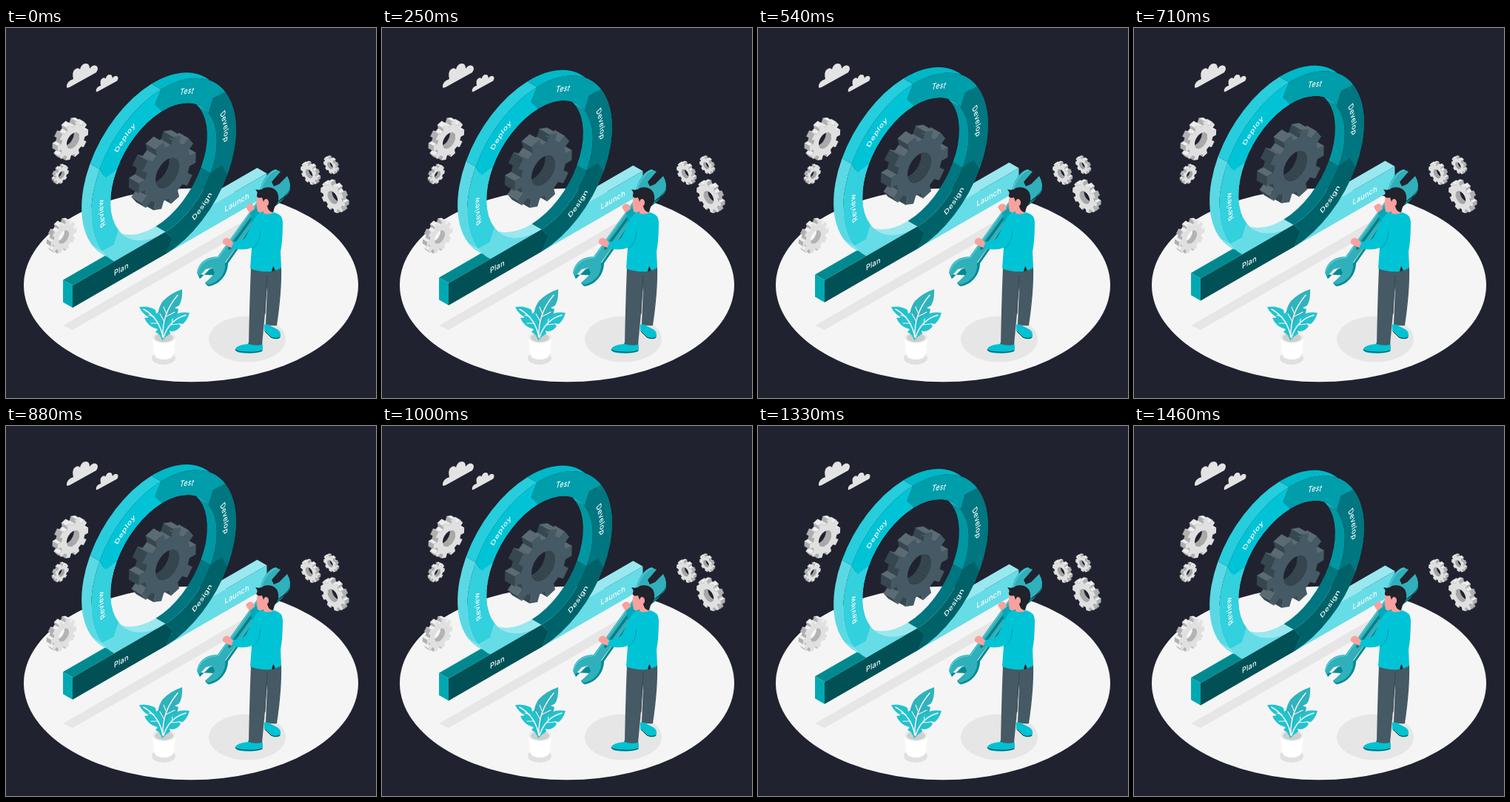
An HTML page that plays this animation: 500 by 500 pixels, repeating every 1.5 s.

```html
<!DOCTYPE html>
<html lang="en">
<head>
<meta charset="utf-8">
<title>Development cycle</title>
<style>
html, body { margin: 0; height: 100%; overflow: hidden; background: #20222f; }
svg { display: block; width: 100vw; height: 100vh; }
text { font: 500 10.5px Inter, sans-serif; letter-spacing: .25px; fill: #fff; text-anchor: middle; }
</style>
</head>
<body>
<svg id="stage" viewBox="0 0 500 500"></svg>
<script>
const OUTER = 113, MID = 98, INNER = 83, DEPTH = 15, PERIOD = 1500, LIFT = 10;

const polar = (r, deg) => {
  const a = deg * Math.PI / 180;
  return [r * Math.sin(a), -r * Math.cos(a)];
};
const at = (r, deg, shift = 0) => polar(r, deg).map(c => (c + shift).toFixed(2)).join(' ');
const arcTo = (r, deg, sweep, shift) => `A${r} ${r} 0 0 ${sweep} ${at(r, deg, shift)}`;
const shape = (fill, d, extra = '') => `<path fill="${fill}" d="${d}" ${extra}/>`;
const line = (color, width, d) =>
  `<path fill="none" stroke="${color}" stroke-width="${width}" stroke-linecap="round" d="${d}"/>`;
const ellipse = (fill, x, y, rx, ry) =>
  `<ellipse fill="${fill}" cx="${x}" cy="${y}" rx="${rx}" ry="${ry}"/>`;

// Isometric wall planes: side -1 rises to the right, side 1 falls to the right.
const plane = (x, y, side, content) =>
  `<g transform="matrix(.866 ${side * .5} 0 1 ${x} ${y})">${content}</g>`;

function gear(x, y, radius, teeth, side, [face, top, wall]) {
  const rim = [], hole = [], depth = radius * .34, dx = side * depth;
  for (let i = 0; i < teeth; i++) {
    for (const [f, r] of [[-.31, .79], [-.23, 1], [.23, 1], [.31, .79]])
      rim.push(polar(r * radius, (i + f) * 360 / teeth + 20));
  }
  for (let a = 360; a > 0; a -= 12) hole.push(polar(radius * .41, a));
  const walls = (points, lit) => points.map((p, i) => {
    const q = points[(i + 1) % points.length];
    const nx = q[1] - p[1], ny = p[0] - q[0];
    if (nx * dx - ny * depth <= 0) return '';
    const fill = -ny > Math.abs(nx) * 1.2 ? lit : wall;
    return shape(fill, `M${p}L${q}l${dx} ${-depth}L${p[0] + dx} ${p[1] - depth}Z`,
      `stroke="${fill}" stroke-width=".3"`);
  }).join('');
  const outline = `M${rim.join('L')}ZM${hole.join('L')}Z`;
  return plane(x, y, side, walls(hole, wall) + walls(rim, top) + shape(face, outline, 'fill-rule="evenodd"'));
}

// start angle, face, outer wall, inner wall
const segments = [
  [178, '#66dce6', '#80e3eb', '#99e8ef'],
  [238, '#33d0de', '#5ad9e4', '#80e3eb'],
  [298, '#00c4d6', '#26cddc', '#33d0de'],
  [-2, '#009dab', '#00b8c8', '#1ab4c0'],
  [58, '#007680', '#00919c', '#0097a2'],
  [118, '#006269', '#007680', '#007680']
];

function ring() {
  const wall = (r, a, fill) => shape(fill,
    `M${at(r, a)}${arcTo(r, a + 60, 1)}L${at(r, a + 60, -DEPTH)}${arcTo(r, a, 0, -DEPTH)}Z`);
  const face = (a, fill) => shape(fill,
    `M${at(OUTER, a)}${arcTo(OUTER, a + 60, 1)}L${at(MID, a + 54)}L${at(INNER, a + 60)}` +
    `${arcTo(INNER, a, 0)}L${at(MID, a - 6)}Z`);
  return segments.map(([a, , outer, inner]) => wall(INNER, a, inner) + wall(OUTER, a, outer)).join('') +
    segments.map(([a, fill]) => face(a, fill)).join('');
}

function ringLabel(word, angle, reverse) {
  const r = MID + (reverse ? 3.8 : -3.8), from = reverse ? 40 : -40;
  return `<path id="${word}" fill="none" d="M${at(r, angle + from)}${arcTo(r, angle - from, reverse ? 0 : 1)}"/>
    <text><textPath href="#${word}" startOffset="50%">${word}</textPath></text>`;
}

const barLabel = (word, u) => `<text x="${u}" y="102.5">${word}</text>`;

const pale = ['#e0e0e0', '#ededed', '#b0b0b0'];
const steel = ['#455a64', '#5b6b74', '#37474f'];
const cloud = 'M82 79Q82 72 91 69Q89 61 92 57Q97 52 100 56Q102 48 108 48Q113 48 113 55Q117 49 122 51Q126 54 122 60L86 80Q81 82 82 79Z';

const backdrop =
  ellipse('#f5f5f5', 250, 347.5, 226, 130.8) +
  shape('#e6e6e6', 'M77 402L338 251L352 258L90 408Z') +
  ellipse('#e6e6e6', 326, 420.5, 52, 31) +
  ellipse('#e0e0e0', 213, 446, 16, 9) +
  shape('#e3e3e3', cloud) +
  shape('#e3e3e3', cloud, 'transform="translate(63.5 28.8) scale(.71)"') +
  gear(90.5, 152, 24, 10, -1, pale) + gear(75, 198.5, 11.4, 9, -1, pale) + gear(78, 282.5, 20, 10, -1, pale) +
  gear(441.5, 229, 19, 10, 1, pale) + gear(409.6, 197, 13.4, 10, 1, pale) + gear(438, 186, 10.5, 9, 1, pale);

const loop = gear(218, 196, 45, 10, -1, steel) + plane(213, 194, -1,
  shape('#99e8ef', `M60 ${INNER}H161l-15 -15H45Z`) +
  shape('#66dce6', `M0 ${INNER}H161V${OUTER}H0Z`) +
  shape('#008a90', `M-142 ${INNER}l-15 -15H-75l15 15Z`) +
  ring() +
  shape('#00a9b2', `M-142 ${INNER}l-15 -15v30l15 15Z`) +
  shape('#005055', `M-142 ${INNER}L${at(INNER, 178)}L${at(MID, 172)}L${at(OUTER, 178)}L0 ${OUTER}H-142Z`) +
  barLabel('Plan', -66) + barLabel('Launch', 114.5) +
  ringLabel('Test', 22) + ringLabel('Develop', 82) + ringLabel('Design', 142, true) +
  ringLabel('Deploy', -38.5) + ringLabel('Review', -95));

const plant =
  shape('#fff', 'M198 418L200 440Q202 448 213 448Q225 448 227 440L229 418Z') +
  ellipse('#ededed', 213.5, 418, 15.5, 8) + ellipse('#cfcfcf', 213.5, 418.5, 12.5, 6) +
  shape('#2fb3bd', 'M212 421C202 402 203 381 212 369Q223 358 238 353Q239 366 234 375L228 378L233 380Q231 392 225 395L219 396L223 400Q217 407 212 421Z') +
  shape('#22c3ce', 'M211 422Q208 413 202 411L205 407Q192 404 187 392L193 391Q184 386 180 377Q193 375 202 381L203 386L206 384Q214 394 212 422Z') +
  shape('#22c3ce', 'M213 421C212 405 217 393 226 388L228 391L231 386Q239 383 248 385Q245 395 239 400L233 399L236 403Q231 410 224 410L221 409L222 413Q216 416 213 421Z') +
  line('#f5f5f5', 1.5, 'M212 418C211 396 219 376 232 361M186 380C200 388 209 401 212 418M243 388C228 392 218 402 213 418') +
  line('#f5f5f5', 1.1, 'M214 397L208 386M217 387L213 377M216 390L228 384M200 390L193 388M206 399L196 399M224 400L225 393M223 401L233 400');

const wrench =
  shape('#008a93', 'M259 333L262 339L275 326L297 317L351 240L363 236Q379 231 384 219V207L381 222Q370 242 352 244L300 318C300 333 288 348 273 349L269 345L280 334Z') +
  shape('#30b0ba', 'M258 331C260 316 272 309 286 309L341 232C343 209 353 194 364 191L371 194L359 208L362 214L369 211L380 200Q387 212 381 222Q371 235 352 240L296 317C298 331 288 344 273 347L269 344L277 338L282 331L279 324L270 326L261 336Z') +
  line('#57cbd4', 1.3, 'M259 330C262 317 273 311 287 310L342 232C344 211 354 196 365 192') +
  line('#00808a', 3.5, 'M302 298L339 247');

const man =
  // far leg, near leg, shoes
  shape('#00c2d3', 'M349 402Q350 398 355 401L368 408Q373 413 370 419Q364 422 358 418L349 409Z') +
  line('#263238', 1, 'M350 410L358 418Q365 421 370 418') +
  shape('#455a64', 'M347 326L372 322Q373 355 366 402Q358 403 351 400L353 350Z') +
  shape('#00c2d3', 'M327 425L346 425Q348 433 346 437Q335 441 317 439Q309 438 310 433Q314 428 327 427Z') +
  line('#263238', 1, 'M310 435Q314 438 326 438Q339 439 346 436') +
  shape('#455a64', 'M331 323L356 326Q351 360 350 386L346 428Q336 430 328 427Q329 371 331 323Z') +
  line('#37474f', 1, 'M353 334Q351 360 350 386') +
  // far hand and head
  shape('#f7a29f', 'M324 242Q329 235 334 239L337 246L329 250Z') +
  shape('#00a9b8', 'M330 249L338 243L345 256L333 266Z') +
  shape('#f7a29f', 'M340 227Q338 235 339 241L340 248Q344 250 348 248L347 255L361 255L361 236Q354 223 340 227Z') +
  shape('#20222c', 'M337 218Q344 220 349 216Q362 213 367 223Q371 234 363 242L361 249Q355 249 353 241L348 235L346 229Q338 231 339 225Q341 223 337 218Z') +
  ellipse('#f7a29f', 351.5, 236, 3.5, 5) +
  // shirt and near arm
  shape('#00c4d6', 'M345 249Q354 254 362 249Q374 252 374 262Q374 288 371 302L372 324L364 328L361 321L359 329Q341 330 330 325L332 297Q322 301 308 298L303 289Q318 289 324 283L331 268Q336 253 345 249Z') +
  shape('#263238', 'M361 321L364 328L359 329Z') +
  line('#009bab', 1, 'M333 298Q343 292 344 275') +
  shape('#f7a29f', 'M293 287Q297 281 302 285L307 290L305 297Q297 294 293 291Z');

stage.innerHTML = `${backdrop}<g id="floating">${loop}</g>${plant}${wrench}${man}`;
const floating = document.getElementById('floating');

function frame(now) {
  const phase = now % PERIOD / PERIOD;
  const lift = LIFT * (1 - Math.abs(1 - 2 * phase));
  floating.setAttribute('transform', `translate(0 ${-lift.toFixed(3)})`);
  requestAnimationFrame(frame);
}
frame(0);
</script>
</body>
</html>
```
